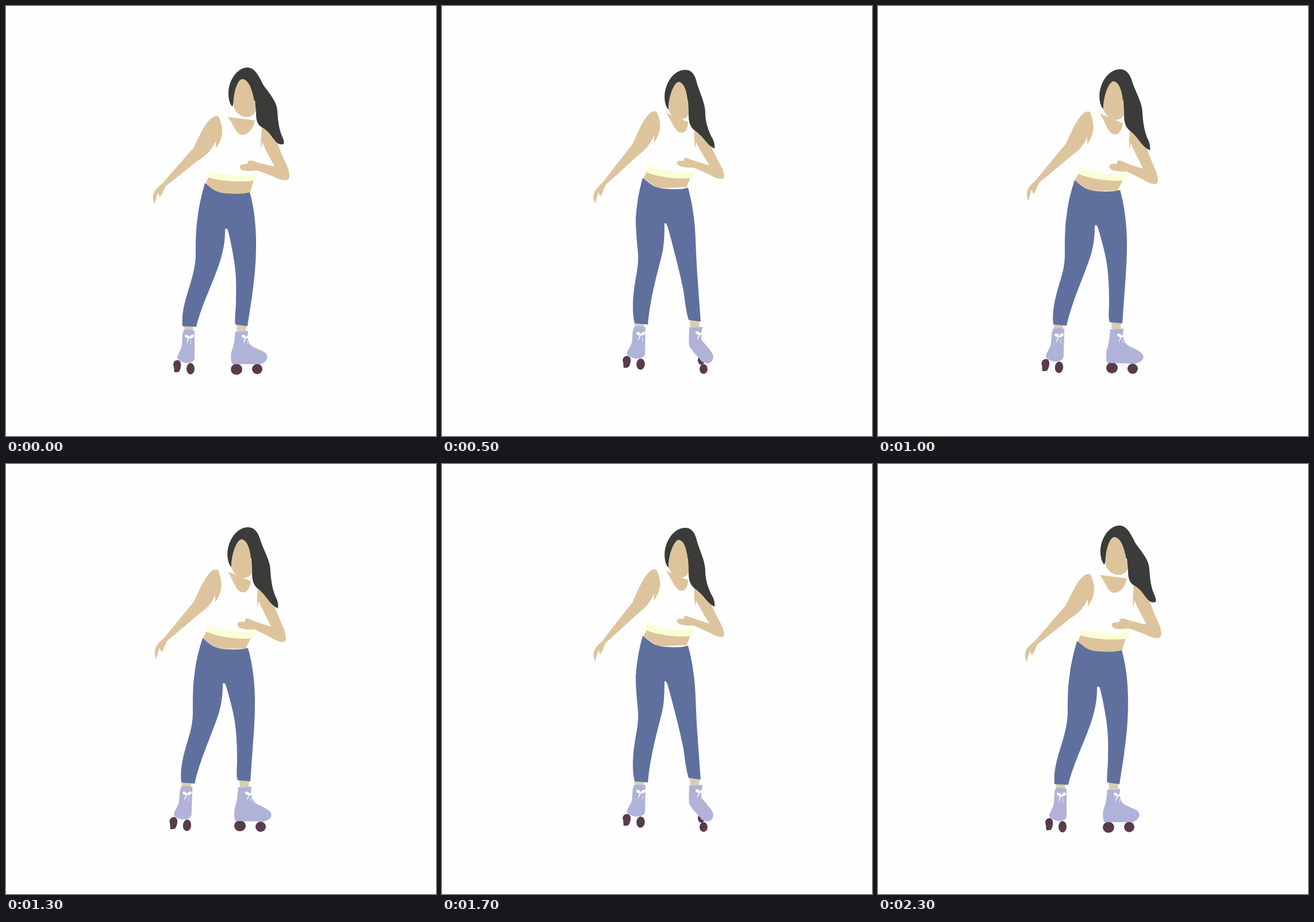
An HTML page with a canvas for the animation above (2400 ms loop, 748 by 748 pixels).

```html
<!DOCTYPE html>
<html>
<head>
<meta charset="utf-8">
<title>Roller skater</title>
<style>
  html, body { margin: 0; height: 100%; overflow: hidden; background: #fefefe; }
  canvas { display: block; }
</style>
</head>
<body>
<canvas id="stage" width="748" height="748"></canvas>
<script>
const ctx = document.getElementById('stage').getContext('2d');

const SKIN = '#ddc49c', HAIR = '#3b3b3a', DENIM = '#5f709f', SHOE = '#b0b3d7',
      WHEEL = '#583b4c', HEM = '#f9ffd5', SOCK = '#d6ceb1', LACE = '#ffffff';

const mix = (a, b, u) => a + (b - a) * u;

// Blend of neighbouring poses; p runs from 0 to 3
const between = (poses, p, blend) => {
  const i = Math.min(Math.floor(p), poses.length - 2);
  return blend(poses[i], poses[i + 1], p - i);
};

const blendLists = (a, b, u) => a.map((n, i) => mix(n, b[i], u));

const blendPaths = (a, b, u) => {
  const ends = b.match(/-?[\d.]+/g);
  let i = 0;
  return a.replace(/-?[\d.]+/g, n => mix(+n, +ends[i++], u));
};

// One anchor point shifts a part, three anchor points bend it affinely
const frame = ([x, y, ux, uy, vx, vy]) => new DOMMatrix(
  ux === undefined ? [1, 0, 0, 1, x, y] : [ux - x, uy - y, vx - x, vy - y, x, y]);

const draw = (color, path, matrix = new DOMMatrix()) => {
  ctx.setTransform(matrix);
  ctx.fillStyle = color;
  ctx.fill(new Path2D(path));
};

const rigid = (color, anchors, path) => p => draw(color, path,
  frame(between(anchors, p, blendLists)).multiply(frame(anchors[0]).inverse()));

const morph = (color, poses) => p => draw(color, between(poses, p, blendPaths));

const oval = (x, y, rx, ry) =>
  `M${x - rx},${y}a${rx},${ry} 0 1 0 ${2 * rx},0a${rx},${ry} 0 1 0 ${-2 * rx},0`;

const bow = 'M319,577C315,579 311,577 311,573C313,570 318,573 319,576C321,572 325,570 327,573C327,577 322,579 319,577Z' +
  'M318,577C315,580 314,584 314,588C316,584 317,580 320,577C322,581 321,585 321,590C323,585 322,580 319,577Z';

const leftFoot = [
  [318, 564, 298, 627, 321, 631],
  [314, 561, 291.5, 625, 315, 628.5],
  [329, 559, 302.5, 619, 326.5, 623],
  [343.5, 558, 321.5, 619.5, 345.5, 623]];

const parts = [
  // arms
  rigid(SKIN, [
    [370, 193, 259, 344, 365, 247],
    [369, 185, 262, 339, 364, 240],
    [370, 184, 265, 342, 367, 237],
    [373, 184, 267, 343, 369, 237]],
    'M359,194C363,191 368,191 370,193C374,202 377,213 376,221C375,232 369,243 365,247L365,235C356,254 346,261 335,268' +
    'C315,284 295,300 278,313C274,319 272,329 268,332C266,331 265,327 265,324C262,331 260,338 259,344' +
    'C254,338 255,326 260,320C266,314 269,311 272,309C290,288 308,267 326,247C334,232 346,202 359,194Z'),
  rigid(SKIN, [
    [444, 249, 493, 297, 407, 280],
    [438, 250, 487, 304, 403, 279],
    [439, 244, 489, 293, 407, 271],
    [441, 248, 491, 296, 409, 273]],
    'M445,208C452,214 462,224 469,231C475,245 480,260 486,272L492,286C491,289 493,290 493,295C493,299 491,303 487,303' +
    'C478,303 471,300 464,296L437,286C428,287 416,288 410,285C405,282 406,277 410,276C414,275 418,275 421,274' +
    'C419,270 423,268 427,269C440,273 455,277 467,279C460,265 452,252 446,237L444,249C442,235 445,220 445,208Z'),
  // neckline
  rigid(SKIN, [
    [386, 193, 433, 199, 411, 224],
    [386, 187, 426, 204, 409, 223],
    [386, 184, 426, 198, 410, 218],
    [390, 186, 428, 202, 414, 220]],
    'M386,193L433,199C430,213 422,224 411,224C402,224 397,211 393,204C390,199 388,196 386,193Z'),
  morph(HAIR, [
    'M394,175C387,169 385,150 389,137C395,119 407,107 420,107C433,107 440,122 448,138C458,152 471,166 472,182C473,200 475,214 480,226C483,232 484,237 483,240C474,243 470,237 463,228C457,219 450,213 445,211C436,206 435,195 435,186L433,165L402,145Z',
    'M392,179C385,173 383,153 388,140C394,122 407,110 421,110C434,110 440,122 444,137C450,153 460,170 460,186C461,204 464,220 469,231C473,238 474,245 473,251C466,248 460,242 455,235C449,227 443,220 437,216C430,210 428,200 428,190L427,165L400,146Z',
    'M392,178C385,172 383,153 388,140C394,122 407,110 422,110C434,110 440,121 443,135C447,150 457,168 457,184C457,200 463,213 468,224C472,231 474,238 473,243C466,241 460,234 455,228C449,222 443,218 438,214C429,208 427,198 427,188L426,165L400,145Z',
    'M394,180C387,174 385,154 390,141C396,123 409,111 423,111C436,111 441,122 444,136C449,152 458,170 458,186C458,202 463,215 468,226C473,234 475,241 474,248C467,245 461,238 456,232C450,225 445,220 439,216C431,210 429,200 429,190L428,165L402,146Z']),
  // face
  rigid(SKIN, [
    [411, 127, 396, 175, 434, 178],
    [410, 131, 392, 178, 428, 184],
    [410, 130, 392, 175, 427, 182],
    [412, 132, 394, 178, 429, 184]],
    'M411,127C424,128 430,150 434,178C436,186 428,193 419,193C408,193 398,184 396,175C394,158 401,128 411,127Z'),
  // belly
  rigid(SKIN, [
    [353, 296, 431, 303, 347, 310],
    [350, 290, 427, 300, 342, 303],
    [354, 287, 431, 294, 347, 300],
    [357, 287, 434, 294, 350, 300]],
    'M353,296L347,310L375,328L424,326L431,303Z'),
  rigid(HEM, [
    [353, 286, 438, 291, 352, 298],
    [350, 279, 434, 290, 349, 292],
    [354, 276, 438, 284, 353, 289],
    [356, 276, 439, 286, 355, 289]],
    'M353,286C372,294 415,298 438,291C439,296 437,300 434,303C418,307 375,306 352,298C351,294 352,289 353,286Z'),
  // socks
  rigid(SOCK, leftFoot, 'M310,554L326,556L325,567L310,566Z'),
  rigid(SOCK, [[410, 566], [415, 562], [427, 559], [440, 558]], 'M401,554L418,554L417,568L402,568Z'),
  // trousers
  morph(DENIM, [
    'M346,308C352,312 362,323 375,325C390,327 410,328 424,324C431,348 435,380 435,412C435,450 432,475 428,505L420,557L399,554C397,545 400,530 400,515C401,480 400,465 397,445C394,425 390,405 386,390C385,387 381,385 381,391C381,410 378,425 373,442C362,478 340,520 331,558L307,557C305,535 311,515 317,495C324,473 329,455 330,435C330,410 330,390 333,370C336,345 340,330 346,308Z',
    'M342,303C348,307 359,319 372,321C387,323 407,324 421,320C429,348 433,382 433,415C433,450 430,480 428,510L425,552L403,550C400,540 402,530 402,515C402,480 400,455 395,432C391,415 387,400 382,384C381,381 377,379 377,384C377,405 374,422 369,437C357,473 337,515 328,556L305,554C302,530 309,505 315,485C322,462 325,450 325,430C325,405 325,385 328,365C331,340 335,325 342,303Z',
    'M347,300C353,304 363,315 376,317C391,319 411,320 425,316C432,343 436,374 436,407C437,440 437,475 436,505L436,549L415,547C411,540 411,525 409,505C407,485 403,460 399,435C395,415 391,400 387,384C386,379 382,376 382,382C382,400 381,415 378,430C371,465 353,510 344,554L320,552C318,530 324,500 328,482C332,462 334,450 334,432C333,410 332,390 333,370C336,340 341,322 347,300Z',
    'M349,299C355,303 367,315 380,317C395,319 414,320 428,316C436,345 440,375 441,405C442,430 443,455 445,480L450,549L429,546C424,530 423,515 420,495C415,470 411,455 406,435C401,415 397,400 393,386C391,378 387,375 387,380C387,400 386,420 382,435C373,470 362,510 358,554L335,552C330,530 332,505 336,480C339,462 342,450 341,430C339,410 337,390 337,370C339,340 343,322 349,299Z']),
  // left skate
  rigid(WHEEL, leftFoot,
    'M299,616C304,617 305,623 304,628C303,633 302,636 299,637L293,637C292,634 293,630 291,624C291,619 294,616 299,616Z' +
    oval(321, 631, 7, 10)),
  rigid(SHOE, leftFoot,
    'M309,564C315,563 322,563 328,565L328,612C328,618 322,621 314,621C306,620 299,616 298,612C298,606 305,598 306,590C307,580 306,572 309,564Z'),
  rigid(LACE, [[319, 577], [315, 575], [330, 572], [346, 572]], bow),
  // right skate
  morph(WHEEL, [oval(401, 632, 10, 9.5), oval(407, 629.5, 10, 9.5), oval(428, 630, 9.5, 9.5), oval(451, 616, 6, 8)]),
  morph(WHEEL, [oval(437, 631.5, 9, 9), oval(443, 631, 9, 9), oval(453, 629, 8.5, 8.5), oval(455, 631.5, 7, 8.5)]),
  morph(SHOE, [
    'M399,566C407,568 414,566 421,565C420,575 421,587 427,591C436,598 450,599 454,607C457,615 449,621 443,623L394,623C390,617 391,604 393,599C397,590 398,577 399,566Z',
    'M404,562C412,563 419,562 427,561C426,573 427,584 433,589C441,595 457,599 461,607C464,616 455,620 448,622L399,621C396,615 397,603 398,598C402,588 403,573 404,562Z',
    'M417,559C425,560 432,559 439,558C438,570 439,582 444,587C452,594 467,597 470,605C473,613 465,618 458,620L416,620C412,614 413,603 414,597C415,585 415,570 417,559Z',
    'M430,559C438,560 445,559 453,558C452,568 450,579 454,584C460,591 470,601 472,609C472,617 468,621 461,622L452,619C447,611 438,605 430,591C429,582 430,570 430,559Z']),
  p => {
    const [x, y] = between([[418, 577], [424, 575], [436, 572], [449, 571]], p, blendLists);
    draw(LACE, bow, new DOMMatrix([1, 0, 0, 1, x - 319, y - 577]));
  }
];

// Six stepped poses, swinging there and back every 1200 ms
function tick(now) {
  const slot = Math.floor(now % 1200 / 100);
  const step = slot < 6 ? slot : 11 - slot;
  const pose = step ? (step + 1) / 2 : 0;
  ctx.resetTransform();
  ctx.clearRect(0, 0, 748, 748);
  parts.forEach(part => part(pose));
}

const start = performance.now();
(function loop() {
  tick(performance.now() - start);
  requestAnimationFrame(loop);
})();
</script>
</body>
</html>
```
